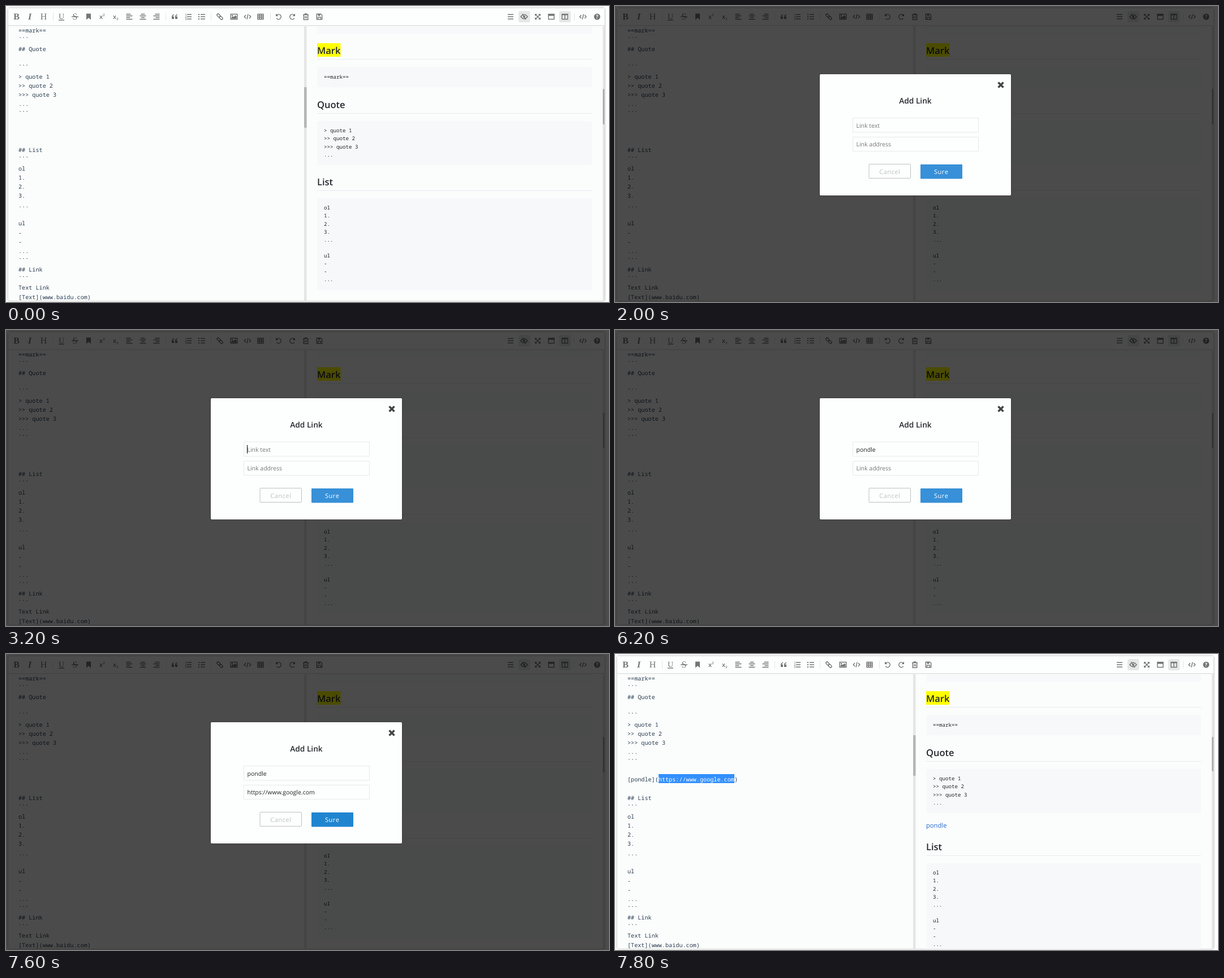
Recreate the animation shown at these times as an HTML page. Size 1066x525 px, loop 8000 ms.

```html
<!DOCTYPE html>
<html lang="en">
<head>
<meta charset="utf-8">
<title>Add link in a Markdown editor</title>
<style>
html, body { margin: 0; width: 100%; height: 100%; overflow: hidden; background: #fff; }
svg { display: block; }
text { text-rendering: geometricPrecision; white-space: pre; font-family: "Open Sans", "Noto Sans", sans-serif; fill: #24292e; }
.edit { font: 10.16px "Noto Sans Mono", monospace; fill: #2c3e50; }
.code { font: 9.17px "Noto Sans Mono", monospace; }
.head { font-size: 16.5px; font-weight: 600; }
.title { font-size: 13.7px; font-weight: 600; }
.field { font-size: 10.5px; }
.button { font-size: 11px; letter-spacing: .5px; text-anchor: middle; }
.serif { font-family: "Liberation Serif", serif; font-size: 16px; text-anchor: middle; fill: #757575; }
.script { font: 600 11px "Open Sans", sans-serif; text-anchor: middle; fill: #757575; }
.icon { stroke: #757575; fill: none; stroke-width: 1.4; }
.solid { fill: #757575; }
</style>
</head>
<body>
<svg width="1066" height="525" viewBox="0 0 1066 525">
  <clipPath id="panes"><path d="M4 36H1058V523H4z"/></clipPath>
  <filter id="shadow" x="-10%" y="-10%" width="120%" height="120%">
    <feDropShadow dx="0" dy="0" stdDeviation="1.5" flood-opacity=".25"/>
  </filter>
  <rect x="3.5" y="3.5" width="1055" height="519.5" rx="3" fill="#fbfdfd" stroke="#ddd" filter="url(#shadow)"/>
  <path d="M4 4H1058V34H4z" fill="#fdfefe"/>
  <path d="M4 34.5H1058" stroke="#ddd"/>
  <path d="M4 35.5H1058" stroke="#f2f3f3"/>
  <rect id="linkHover" x="368" y="9" width="21" height="20" rx="3" fill="#e6e8e8"/>
  <g id="toolbar"></g>
  <g clip-path="url(#panes)">
    <path d="M527 36h4.5V523h-4.5zM1055 36h3V523h-3z" fill="#e5e5e5"/>
    <rect x="527" y="144" width="4.5" height="72" rx="1" fill="#b5b5b5"/>
    <rect id="thumb" x="1055" y="147" width="3" height="63" rx="1" fill="#b0b0b0"/>
    <g id="editor"></g>
    <g id="inserted">
      <path d="M77 213H211V229H77z" fill="#3390ff"/>
      <text class="edit" x="22" y="226.3">[pondle](<tspan fill="#fff">https://www.google.com</tspan>)</text>
      <text x="550" y="308" font-size="11.2" style="fill:#2666cc">pondle</text>
    </g>
    <g id="preview"></g>
    <g id="list"></g>
  </g>
  <g id="modal">
    <path d="M0 0H1066V525H0z" opacity=".7"/>
    <rect x="362" y="121" width="338" height="215" rx="2" fill="#fdfefe" filter="url(#shadow)"/>
    <path d="M677.5 135.5l9 9m0-9l-9 9" stroke="#444" stroke-width="3.4"/>
    <text class="title" x="531" y="173" text-anchor="middle">Add Link</text>
    <path d="M420.5 198.5h222v25.5h-222zM420.5 232.5h222v25h-222z" fill="none" stroke="#e8eaea"/>
    <text class="field" id="name" x="426.5" y="215.5"></text>
    <text class="field" id="address" x="426.5" y="248.5"></text>
    <path id="caret" stroke="#000"/>
    <rect x="449" y="280.5" width="73.5" height="25" rx="1" fill="none" stroke="#bfc1c1"/>
    <text class="button" x="485.7" y="297.5" style="fill:#bfc1c1">Cancel</text>
    <rect id="sure" x="540" y="281" width="74" height="25.5" rx="1"/>
    <text class="button" x="576.7" y="297.5" style="fill:#fff">Sure</text>
  </g>
</svg>
<script>
const $ = id => document.getElementById(id);
const add = (id, markup) => $(id).insertAdjacentHTML('beforeend', markup);
const esc = s => s.replace(/>/g, '&gt;');
const lines = (id, cls, x, y, step, content) => content.split('\n').forEach((s, i) =>
  add(id, `<text class="${cls}" x="${x}" y="${y + i * step}">${esc(s)}</text>`));

// Toolbar: every icon is drawn around its own centre.
const icon = (x, stroke, fill = '') => add('toolbar',
  `<g transform="translate(${x} 19)"><path class="icon" d="${stroke}"/><path class="solid" d="${fill}"/></g>`);
const glyph = (x, s, style = '', cls = 'serif', y = 24) => add('toolbar',
  `<text class="${cls}" x="${x}" y="${y}" style="${style}">${s}</text>`);
const bars = (...rows) => rows.map(([x, w], i) => `M${x} ${i * 3 - 4.5}h${w}`).join('');
const rows3 = 'M-2-4h8M-2 0h8M-2 4h8';

for (const x of [83, 282, 362, 467, 1004])
  add('toolbar', `<path d="M${x}.5 12v14" stroke="#e6e6e6"/>`);
for (const x of [906, 978])
  add('toolbar', `<rect x="${x}" y="9" width="20.5" height="20" rx="3" fill="#e6e8e8"/>`);

glyph(18.5, 'B', 'font-weight:bold');
glyph(42, 'I', 'font-style:italic;font-weight:bold');
glyph(66.5, 'H');
glyph(98, 'U', 'font-size:14px', 'serif', 23);
icon(98, 'M-5 6h10');
glyph(122, 'S');
icon(122, 'M-6 0h12');
icon(146, '', 'M-4-5.5h8v11l-4-3.5-4 3.5z');
glyph(168, 'x', '', 'script', 23);
glyph(173, '2', 'font-size:6px', 'script', 18);
glyph(192, 'x', '', 'script', 23);
glyph(197, '2', 'font-size:6px', 'script', 25);
icon(218, bars([-5.5, 8], [-5.5, 11], [-5.5, 7], [-5.5, 11]));
icon(242, bars([-3.5, 7], [-5.5, 11], [-3, 6], [-5.5, 11]));
icon(266, bars([-2.5, 8], [-5.5, 11], [-1.5, 7], [-5.5, 11]));
icon(298, 'M-4.3 1v-1q0-3 3.3-3.6M1.7 1v-1q0-3 3.3-3.6', 'M-5-.5h4v4.5h-4zM1-.5h4v4.5h-4z');
icon(322, rows3);
['1', '2', '3'].forEach((n, i) => glyph(318, n, 'font-size:5px', 'script', 17 + i * 4));
icon(346, rows3, 'M-6-5h2v2h-2zM-6-1h2v2h-2zM-6 3h2v2h-2z');
add('toolbar', `<g transform="translate(378 19) rotate(45)" class="icon">
  <rect x="-6.3" y="-2" width="6.6" height="4" rx="2"/><rect x="-.3" y="-2" width="6.6" height="4" rx="2"/></g>`);
icon(403, 'M-5.8-4.5h11.6v9h-11.6z', 'M-4.5 3.5v-2l2.5-2.5 1.5 1.5 3-3 2 2v4zM-4-3h2v2h-2z');
for (const x of [427, 1020]) icon(x, 'M-3-3l-2.7 3 2.7 3M3-3l2.7 3-2.7 3M1-4.5l-2 9');
icon(450, 'M-5-4.5h10v9h-10zM-5-1.5h10M-5 1.5h10M-1.7-4.5v9M1.7-4.5v9');
icon(482, 'M-3.5-3a4.5 4.5 0 1 1-.2 6', 'M-5-5.5v4.5h4.5z');
icon(506, 'M3.5-3a4.5 4.5 0 1 0 .2 6', 'M5-5.5v4.5h-4.5z');
icon(530, 'M-5-3.5h10M-1.7-3.5v-1.5h3.4v1.5M-3.7-3.5v8.7h7.4v-8.7M-1.3-1v4M1.3-1v4');
icon(554, 'M-4.7-4.7h7.4l2 2v7.4h-9.4zM-2.5 4.5v-3.5h5v3.5', 'M-2.5-4.5h4v3h-4z');
icon(892, 'M-5-4h10M-5 0h10M-5 4h10');
icon(916, 'M-6 0Q0-7.5 6 0Q0 7.5-6 0zM-3.5-5l6.5 10', 'M-2 0a2 2 0 1 1 4 0a2 2 0 1 1-4 0');
icon(940, 'M-4-4l8 8M4-4l-8 8', 'M-5-5h4l-4 4zM5-5v4l-4-4zM-5 5v-4l4 4zM5 5h-4l4-4z');
icon(964, 'M-5-4.5h10v9h-10z', 'M-5.5-5h11v3.5h-11z');
icon(988, 'M-5-4.5h10v9h-10zM0-4.5v9', 'M-5.5-5h11v2.3h-11z');
icon(1045, '', 'M-5.5 0a5.5 5.5 0 1 1 11 0a5.5 5.5 0 1 1-11 0');
glyph(1045, '?', 'font-size:9px;font-weight:bold;fill:#fff', 'script', 22.3);

lines('editor', 'edit', 22, 47, 16.3, `==mark==
\`\`\`
## Quote

\`\`\`
> quote 1
>> quote 2
>>> quote 3
...
\`\`\`



## List
\`\`\`
ol
1.
2.
3.
...

ul
-
-
...
\`\`\`
## Link
\`\`\`
Text Link
[Text](www.baidu.com)`);

const block = (id, y, h) => add(id, `<rect x="550" y="${y}" width="486" height="${h}" rx="3" fill="#f6f8fa"/>`);
const heading = (id, y, s) => add(id, `<text class="head" x="550" y="${y}">${s}</text>
  <path d="M550 ${y + 9.5}H1036" stroke="#e7eaec"/>`);
block('preview', 20, 29);
lines('preview', 'code', 633, 33, 0, 'g');
add('preview', '<path d="M550 66h41.5v24h-41.5z" fill="#ff0"/>');
heading('preview', 85, 'Mark');
block('preview', 108, 36);
lines('preview', 'code', 562, 129, 0, '==mark==');
heading('preview', 181, 'Quote');
block('preview', 204, 78);
lines('preview', 'code', 562, 224.3, 14.1, '> quote 1\n>> quote 2\n>>> quote 3\n...');
heading('list', 318, 'List');
block('list', 341, 163);
lines('list', 'code', 562, 361.3, 14.1, 'ol\n1.\n2.\n3.\n...\n\nul\n-\n-\n...');

const keyTimes = [3800, 3900, 4000, 4100, 4300, 4400];
const caretTimes = [[3200, 3700], [3800, 4900], [5400, 6200], [6300, 6700], [7200, 7600]];
const show = (id, on) => $(id).setAttribute('visibility', on ? 'visible' : 'hidden');
const fill = (id, value, hint) => {
  $(id).textContent = value || hint;
  $(id).style.fill = value ? '#222' : '#757575';
  return value ? $(id).getComputedTextLength() : 0;
};

function draw(t) {
  show('linkHover', t >= 1400 && t < 2000);
  show('modal', t >= 2000 && t < 7800);
  $('modal').setAttribute('opacity', t < 7700 ? 1 : .87);

  const done = t >= 7700;
  show('inserted', done);
  $('list').setAttribute('transform', `translate(0 ${done ? 30 : 0})`);
  $('thumb').setAttribute('height', done ? 61 : 63);

  const typed = 'pondle'.slice(0, keyTimes.filter(k => k <= t).length);
  const nameWidth = fill('name', typed, 'Link text');
  const addressWidth = fill('address', t >= 6300 ? 'https://www.google.com' : '', 'Link address');
  const second = t >= 5700;
  const x = Math.floor(426 + (second ? addressWidth : nameWidth)) + .5;
  $('caret').setAttribute('d', `M${x} ${second ? 237 : 204}v15`);
  $('caret').setAttribute('opacity', +caretTimes.some(([a, b]) => t >= a && t < b));
  $('sure').setAttribute('fill', t < 7200 ? '#3790d8' : t < 7300 ? '#2c8bd4' : '#2085d0');
}

function tick() {
  draw(performance.now() % 8000);
  requestAnimationFrame(tick);
}
tick();
</script>
</body>
</html>
```
